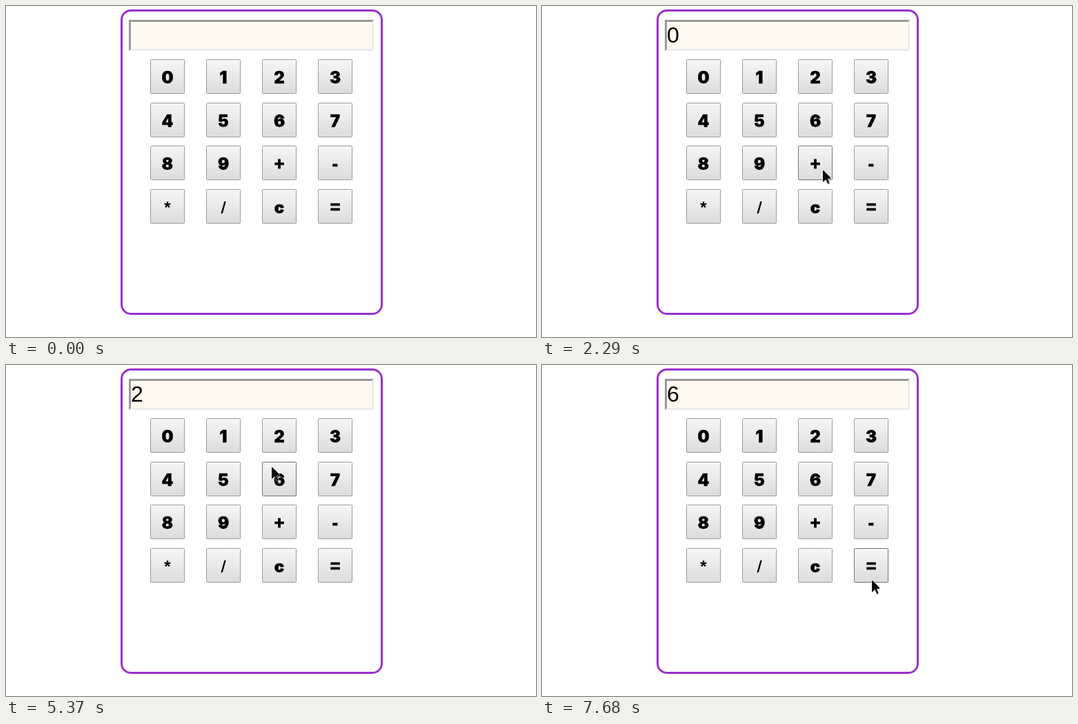
An HTML page for the animation above (8 s loop, 768 px wide and 479 px high).

```html
<!DOCTYPE html>
<html lang="en">
<head>
<meta charset="utf-8">
<title>Calculator</title>
<style>
html, body { margin: 0; width: 100%; height: 100%; overflow: hidden; background: #fff; }
svg { display: block; }
text { font-family: "Liberation Sans", Arial, sans-serif; }
.key rect { fill: url(#face); stroke: #9b9b9b; }
.key.hover rect { stroke: #737373; }
.key.down rect { fill: url(#pressed); }
.key text { font-size: 24px; font-weight: 700; text-anchor: middle; }
.key .wide { font: 900 24px Inter, sans-serif; stroke: #000; stroke-width: .4px; }
.key .heavy { font-size: 25px; stroke: #000; stroke-width: .8px; }
.key .thin { font-weight: 400; stroke: #000; stroke-width: .5px; }
#screen { font-size: 32px; }
</style>
</head>
<body>
<svg width="768" height="479" viewBox="0 0 768 479">
  <defs>
    <linearGradient id="face" x2="0" y2="1">
      <stop stop-color="#f6f6f6"/><stop offset="1" stop-color="#dcdcdc"/>
    </linearGradient>
    <linearGradient id="pressed" x2="0" y2="1">
      <stop stop-color="#e6e6e6"/><stop offset="1" stop-color="#d6d6d6"/>
    </linearGradient>
  </defs>
  <rect x="167.5" y="6.5" width="377" height="439" rx="13.5" fill="#fff" stroke="#9932cc" stroke-width="3"/>
  <rect x="178" y="20" width="355" height="45" fill="#ededed"/>
  <path d="M178 20H533L530 23H181V62L178 65Z" fill="#999"/>
  <rect x="181" y="23" width="349" height="39" fill="#fffaf0"/>
  <text id="screen" x="181" y="53"></text>
  <g id="keys"></g>
  <path id="arrow" d="M0 0H1L11 10V12H7L9.5 18V19H7L4.5 13 0 17Z" fill="#0a0a0a" stroke="#fff" stroke-width="1" paint-order="stroke"/>
</svg>
<script>
const NS = "http://www.w3.org/2000/svg";
const LOOP = 8000, START = 205, STEP = 1000 / 13;
const LEFT = 209, TOP = 77, GAP_X = 81, GAP_Y = 62.6, SIZE = 50;
const STYLES = { "+": "heavy", "-": "heavy", "=": "heavy", "*": "", "/": "thin" };
const PRESS = 2, RELEASE = 3;

// pointer stops: arrival step, x, y and the key clicked there, if any
const STOPS = [
  [0, 575, 408], [5, 218, 68], [6, 218, 68], [8, 225, 86], [9, 225, 86, "0"],
  [23, 385, 272], [27, 407, 238, "+"], [33, 324, 104, "1"], [39, 442, 306],
  [40, 466, 304, "="], [50, 415, 290, "c"], [55, 415, 290], [57, 374, 217],
  [60, 425, 118], [63, 405, 112, "2"], [75, 310, 285], [78, 243, 291, "*"],
  [84, 472, 104, "3"], [92, 447, 238], [94, 478, 312, "="]
].map(([at, x, y, key]) => ({ at, x, y, key, leave: key ? at + RELEASE : at }));

function add(parent, tag, attrs, label = "") {
  const el = document.createElementNS(NS, tag);
  for (const name in attrs) el.setAttribute(name, attrs[name]);
  el.textContent = label;
  return parent.appendChild(el);
}

const screenText = document.getElementById("screen");
const arrow = document.getElementById("arrow");
const keys = [..."0123456789+-*/c="].map((label, i) => {
  const x = LEFT + GAP_X * (i % 4), y = Math.round(TOP + GAP_Y * (i >> 2));
  const el = add(document.getElementById("keys"), "g", { class: "key" });
  add(el, "rect", { x: x + .5, y: y + .5, width: SIZE - 1, height: SIZE - 1, rx: 1 });
  add(el, "text", { x: x + 25, y: y + 35, class: STYLES[label] ?? "wide" }, label);
  return { el, x, y };
});

function solve(sum) {
  const [, a, op, b] = sum.match(/(\d+)(\D)(\d+)/);
  return String(op === "+" ? +a + +b : a * b);
}

function type(text, key) {
  if (key === "c") return "";
  return key === "=" ? solve(text) : text + key;
}

function pointer(step) {
  const i = STOPS.findLastIndex(s => s.at <= step);
  const from = STOPS[i], to = STOPS[i + 1];
  if (!to || step <= from.leave) return [from.x, from.y];
  const f = (step - from.leave) / (to.at - from.leave);
  const ease = f * (2 - f);
  return [from.x + (to.x - from.x) * ease, from.y + (to.y - from.y) * ease].map(Math.round);
}

function draw(time) {
  const step = Math.floor((time - START) / STEP);
  const shown = step >= 0;
  const [px, py] = shown ? pointer(step) : [-99, -99];
  const clicks = STOPS.filter(s => s.key);
  const pressed = clicks.some(s => s.at + PRESS === step);
  screenText.textContent = clicks
    .filter(s => s.leave <= step)
    .reduce((text, s) => type(text, s.key), "");
  arrow.setAttribute("visibility", shown ? "visible" : "hidden");
  arrow.setAttribute("transform", `translate(${px} ${py})`);
  for (const { el, x, y } of keys) {
    const over = px >= x && px < x + SIZE && py >= y && py < y + SIZE;
    el.classList.toggle("hover", over);
    el.classList.toggle("down", over && pressed);
  }
}

function tick() {
  draw(performance.now() % LOOP);
  requestAnimationFrame(tick);
}
tick();
</script>
</body>
</html>
```
